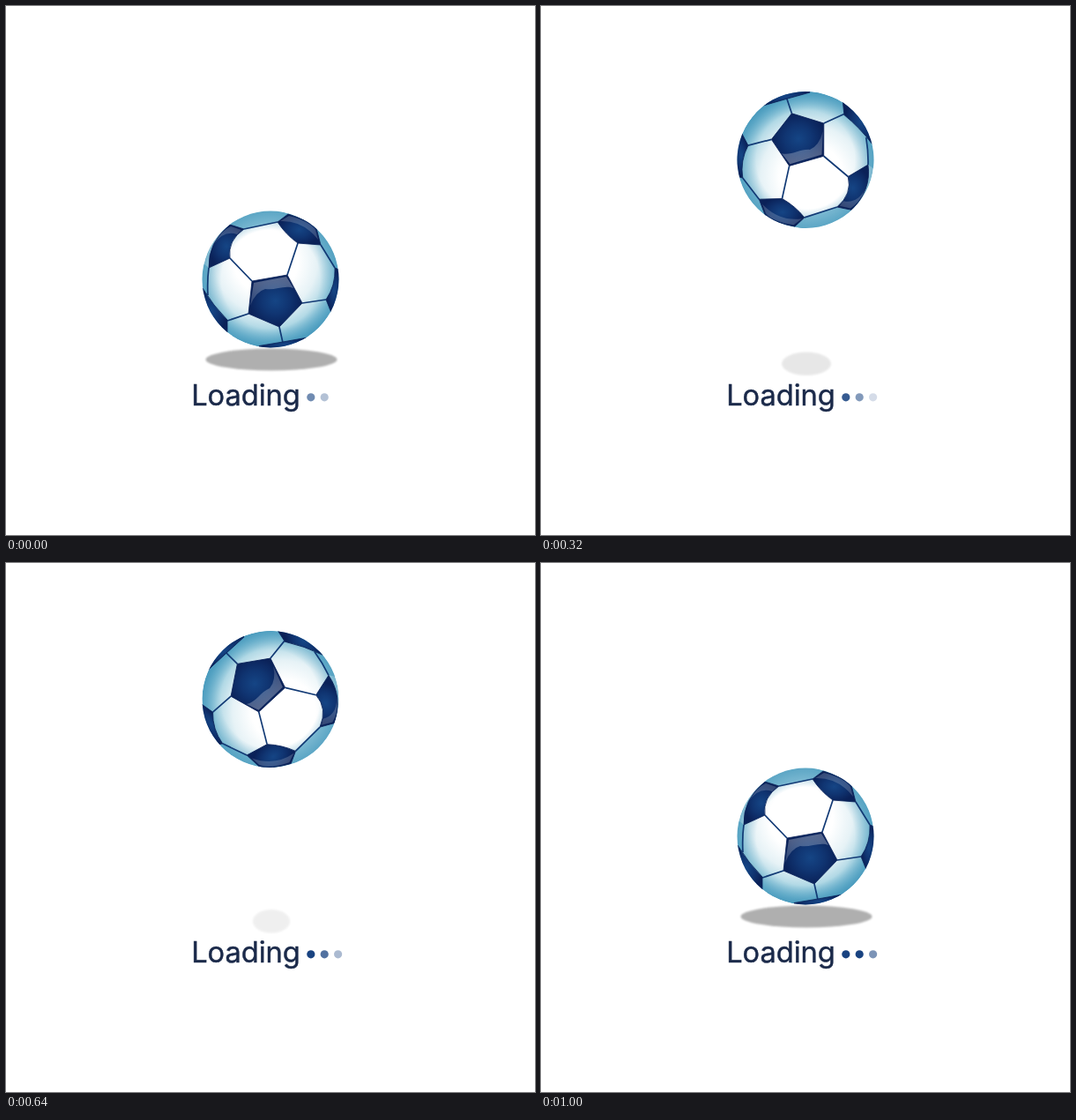
These frames come from a looping animation (600 px wide and 600 px high, 1.04 s). An HTML page:

```html
<!DOCTYPE html>
<html lang="en">
<head>
<meta charset="utf-8">
<title>Loading</title>
<style>
  html, body { margin: 0; width: 100%; height: 100%; overflow: hidden; background: #fff; }
  svg { display: block; width: 100vw; height: 100vh; }
  text {
    font: 32.6px Inter, "Liberation Sans", sans-serif;
    fill: #1b2a4a; stroke: #1b2a4a; stroke-width: .45; text-anchor: middle;
  }
  .seams { fill: none; stroke: #123a75; stroke-width: 1.7; stroke-linejoin: round; }
  .patch { fill: url(#navy); stroke: #0a2158; stroke-width: .8; stroke-linejoin: round; }
  .strip { fill: #5aa8c8; opacity: .7; }
  .gloss { fill: #fff; opacity: .18; }
</style>
</head>
<body>
<svg viewBox="0 0 600 600">
  <defs>
    <radialGradient id="skin" gradientUnits="userSpaceOnUse" cx="295" cy="290" r="100">
      <stop offset=".36" stop-color="#fff"/>
      <stop offset=".58" stop-color="#e6f2f6"/>
      <stop offset=".76" stop-color="#b0d8e5"/>
      <stop offset=".9" stop-color="#6fb4cf"/>
      <stop offset="1" stop-color="#4496ba"/>
    </radialGradient>
    <radialGradient id="rim">
      <stop offset=".72" stop-color="#4296ba" stop-opacity="0"/>
      <stop offset="1" stop-color="#4296ba" stop-opacity=".6"/>
    </radialGradient>
    <radialGradient id="navy">
      <stop offset="0" stop-color="#154585"/>
      <stop offset=".5" stop-color="#103572"/>
      <stop offset="1" stop-color="#0a2158"/>
    </radialGradient>
    <linearGradient id="shine" x2="0" y2="1">
      <stop offset="0" stop-color="#fff" stop-opacity=".32"/>
      <stop offset="1" stop-color="#fff" stop-opacity=".14"/>
    </linearGradient>
    <filter id="soft" x="-20%" y="-30%" width="140%" height="160%"><feGaussianBlur stdDeviation="1.3"/></filter>
    <clipPath id="round"><circle cx="300" cy="310" r="77.5"/></clipPath>
  </defs>

  <ellipse id="shadow" cx="301" filter="url(#soft)"/>

  <g id="ball">
    <g clip-path="url(#round)">
      <circle cx="300" cy="310" r="77.5" fill="url(#skin)"/>
      <!-- outer panels seen edge-on -->
      <path class="strip" d="M254 248L270 253L308 245L320 236L300 228L262 238Z"/>
      <path class="strip" d="M230 297L229 328L218 322L222 290Z"/>
      <path class="strip" d="M349 247L357 271L373 297L384 298L368 255Z"/>
      <circle cx="300" cy="310" r="77.5" fill="url(#rim)"/>
      <path class="seams" d="M279 312L254 286M319 305L331 269M336 337L363 333M310 364L314 382M275 349L251 357
        M270 253L308 245M357 271L373 297M230 297Q228 312 229 328"/>
      <path class="patch" d="M279 312L319 305L336 337L310 364L275 349Z"/>
      <path class="patch" d="M254 248L270 253Q251 266 254 286L230 297Q229 268 254 248Z"/>
      <path class="patch" d="M308 245L320 236Q343 243 352 252L357 271L331 269Q317 259 308 245Z"/>
      <path class="patch" d="M373 297L381 300L380 340L369 348L363 333Q374 317 373 297Z"/>
      <path class="patch" d="M287 385.500L314 381L345 375.500L330 392L290 392Z"/>
      <path class="patch" d="M223 320Q235 340 251 356L251 371L235 372L215 330Z"/>
      <path fill="url(#shine)" d="M281 314L318 307L326 320C316 316 305 323 294 321Q283 324 277 340Z"/>
      <path class="gloss" d="M236 270Q244 255 255 250L267 254L262 259Q247 254 236 270Z"/>
      <path class="gloss" d="M311 244L321 238Q344 244 351 254L354 265Q337 243 311 244Z"/>
    </g>
  </g>

  <text x="272" y="452.800">Loading</text>
  <g id="dots" fill="#194381">
    <circle cx="345.800" cy="443.800" r="4.600"/>
    <circle cx="361.200" cy="443.800" r="4.600"/>
    <circle cx="376.600" cy="443.800" r="4.600"/>
  </g>
</svg>
<script>
  const LOOP = 1040, STEP = 40, TRAVEL = 1000, HEIGHT = 192.4;
  const get = id => document.getElementById(id);
  const ball = get("ball"), shadow = get("shadow"), dots = [...get("dots").children];
  const ease = x => x * x * (3 - 2 * x);
  // start opacity and gain over one bounce
  const fades = [[.62, .8], [.33, .67], [0, .57]];

  function draw() {
    const time = Math.floor(performance.now() % LOOP / STEP) * STEP;
    const u = time / TRAVEL;
    const lift = ease(1 - Math.abs(1 - 2 * u));

    ball.setAttribute("transform", `translate(0 ${-HEIGHT * lift}) rotate(${720 * ease(u)} 300 310)`);
    shadow.setAttribute("cy", 401 + 6.7 * lift);
    shadow.setAttribute("rx", 74.5 - 66 * lift);
    shadow.setAttribute("ry", 12.5 + lift);
    shadow.setAttribute("opacity", .31 * (1 - lift));
    dots.forEach((dot, i) => {
      const [from, gain] = fades[i];
      dot.setAttribute("opacity", Math.min(1, from + gain * u));
    });
    requestAnimationFrame(draw);
  }
  draw();
</script>
</body>
</html>
```
